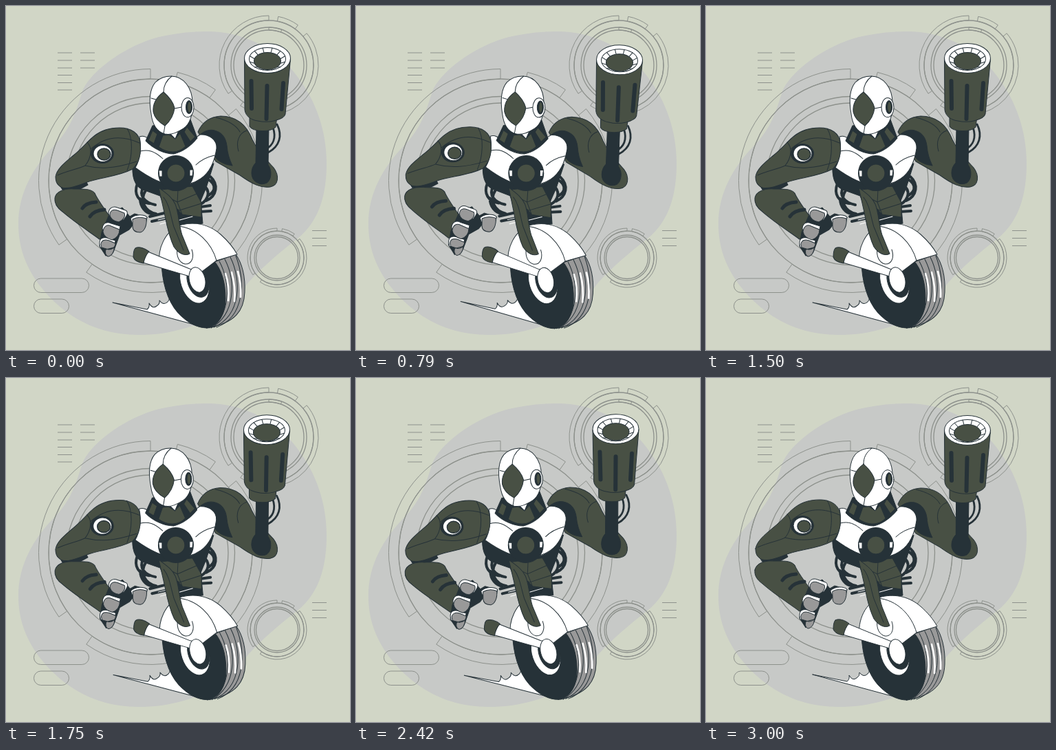
Write an HTML page that moves like this. It is 500 px wide and 500 px high and loops after 3.04 s.

```html
<!DOCTYPE html>
<html lang="en">
<head>
<meta charset="utf-8">
<title>Robot on a wheel</title>
<style>
html, body { margin: 0; width: 100%; height: 100%; overflow: hidden; background: #d1d6c6; }
svg { display: block; width: 100vw; height: 100vh; }
#rings, #panel { fill: none; stroke: #8d918c; stroke-width: 1; }
#robot { stroke: #263238; stroke-width: 1; stroke-linejoin: round; stroke-linecap: round; }
.inner { stroke-width: 1.3; }
.olive { fill: #485044; }
.dark { fill: #263238; }
.white { fill: #fff; }
.grey { fill: #999; }
.line { fill: none; }
.cable { fill: none; stroke-width: 4; }
.slot { fill: none; stroke-width: 6; }
.shine { fill: none; stroke: #fff; stroke-width: 2.6; }
</style>
</head>
<body>
<svg viewBox="0 0 500 500">
  <path fill="#c7c9c7" d="M290 37C340 36 385 58 415 92C448 130 466 178 466 228C466 275 455 312 425 337C402 355 378 374 352 402C330 432 305 455 265 467C235 476 215 478 192 478C120 478 75 440 48 405C25 373 18 345 18 316C18 272 40 234 68 205C92 181 100 160 111 124C124 92 182 52 232 43C252 39 270 37 290 37Z"/>
  <g id="rings"></g>
  <g id="panel">
    <path d="M75 68h21M75 79h21M75 90h21M75 100.500h21M75 111.500h21M75 122h21M108 68h21M108 79h21M108 90h21M445 326.500h21M445 337.500h21M445 348.500h21"/>
    <rect x="40.500" y="396" width="80" height="20.500" rx="10.250"/>
    <rect x="40.500" y="426" width="51" height="20.500" rx="10.250"/>
  </g>

  <g id="robot">
    <!-- raised arm -->
    <path class="olive" d="M279 183C285 169 296 161 312 160C334 160 349 171 358 194C366 211 378 223 389 235C398 247 396 261 384 263C371 265 358 259 340 246L305 226Z"/>
    <path class="dark" d="M281 188C296 174 318 180 321 203C322 215 325 224 329 232C315 230 306 224 302 216Z"/>
    <path class="line" d="M305 162C321 166 334 172 340 183M350 181C338 185 334 198 338 211"/>
    <path class="cable" style="stroke-width:2.800" d="M386 172C393 186 391 199 381 206M394 172C402 188 398 204 381 213"/>
    <path class="dark" d="M364 177H382L381 231C387 239 386 252 379 257C368 262 357 254 357 243C357 236 360 231 363 228Z"/>
    <path class="olive" d="M354 160V175C359 183 384 184 392 176L394 160Z"/>
    <path class="olive" d="M346.500 77L347 151C348 159 355 165 366 167C382 171 404 165 406 157L413.500 77Z"/>
    <path class="slot" d="M356.500 109L357 149M379.500 116L378.500 164M403 112L400.500 150"/>
    <ellipse class="white" cx="380" cy="76" rx="33.500" ry="21.500"/>
    <ellipse class="white" cx="380" cy="77" rx="26.500" ry="16.500"/>
    <g id="muzzle"></g>
    <ellipse class="olive" cx="380" cy="80" rx="19.500" ry="12.500"/>

    <!-- waist cables and torso -->
    <path class="cable" d="M191 258C185 274 193 285 208 287M200 262C192 276 202 286 217 289M203 268C193 284 203 299 218 302M195 280C195 292 203 301 212 302M289 250C304 255 308 268 293 276M297 248C309 259 307 276 291 283M286 260C298 268 295 281 283 288M283 292L297 290M282 299L298 298M209 306L230 301M212 313L240 307"/>
    <path class="dark" d="M184 228C183 248 186 261 199 267L224 276L236 306L250 322L286 316L283 283L291 264L302 229Z"/>
    <path class="olive" d="M226 267L271 262L284 286V307L256 303L239 285Z"/>
    <path class="line" d="M234 277L249 285L277 273M240 291L252 297L284 287M250 267L249 285L256 303"/>
    <path class="line" style="stroke:#fff" d="M249 312L271 306M221 311L242 306M224 317L243 312"/>

    <!-- dust -->
    <path class="white" d="M155 431L205 441Q209 438 208 432Q213 441 219 436Q224 433 223 428Q229 436 235 430Q239 426 237 419L260 445L292 468Z"/>

    <!-- wheel -->
    <path class="grey" d="M300 373L334 361C343 374 348 394 347 416C346 442 334 461 292 468Z"/>
    <path class="line" d="M334 363C348 400 347 452 306 467M326 365C342 397 343 449 302 467M318 368C334 399 334 448 298 468M310 371C327 402 327 451 295 468"/>
    <path class="shine" d="M319 389Q325 407 323 428M328 387Q334 408 332 429M337 386Q342 403 341 423"/>
    <path class="dark" d="M226 368C226 399 234 428 250 446C266 463 280 468 292 468C309 465 319 448 319 425C319 400 313 383 302 370Z"/>
    <ellipse class="white" cx="274" cy="401" rx="20" ry="32" transform="rotate(-18 274 401)"/>
    <ellipse class="dark" cx="279" cy="400" rx="15" ry="24" transform="rotate(-18 279 400)"/>
    <path class="white" d="M223 376C220 353 231 326 255 318C277 313 297 319 312 332C322 341 330 350 336 361L306 370L285 386L264 386Z"/>
    <path class="line" d="M249 320C278 322 299 345 306 370"/>
    <path class="white" d="M249 352C247 364 252 373 260 375C270 376 274 365 270 354"/>
    <path class="white" d="M206 357L267 382C276 383 283 390 277 399L267 393L199 373Z"/>
    <path class="olive" d="M188 352C193 349 202 352 208 357C204 361 201 367 200 374C194 373 187 371 185 365C185 359 186 354 188 352Z"/>
    <ellipse class="white" cx="278" cy="398" rx="11.500" ry="18.500" transform="rotate(-14 278 398)"/>

    <!-- thigh -->
    <path class="olive" d="M222 264C231 271 241 277 246 288C251 300 251 318 256 333L267 360C260 364 251 360 244 350C236 333 233 315 230 300Z"/>
    <path class="line" d="M229 278C238 289 239 305 244 321L258 355"/>

    <!-- chest and neck -->
    <path class="white" d="M194 190C202 187 207 193 213 198L236 211L266 198L282 187C295 186 307 194 306 207C303 227 296 242 283 251C273 258 263 261 247 261C227 260 207 249 188 235C196 221 197 205 194 190Z"/>
    <path class="line" d="M195 211C207 208 216 211 228 222M276 231Q286 221 303 217"/>
    <path class="dark" d="M213 174L203 196C214 208 231 215 244 215C257 212 269 203 278 192L268 165Z"/>
    <path class="olive" d="M213 181L207 195L215 200L220 186ZM228 188L222 205C236 215 251 214 261 204L253 185L246 193L237 187ZM263 176L275 190L268 197L259 183Z"/>
    <path class="white" d="M238 185L246 193L252 179Z"/>
    <circle class="dark" cx="247" cy="243" r="25.500"/>
    <circle class="olive" cx="247" cy="243" r="13"/>
    <path class="white" d="M222 239H227V248H223ZM267 238H272L271 247H267Z"/>

    <!-- head -->
    <path class="white" d="M240 102C258 102 271 119 271 141C272 158 267 172 258 178C250 183 241 188 231 186C220 183 213 173 211 157C208 140 208 122 217 111C223 105 231 102 240 102Z"/>
    <path class="olive" d="M229 125C237 132 243 140 245 148C244 158 239 167 231 174C222 169 216 163 214 154C213 143 218 133 229 125Z"/>
    <path class="line" d="M241 102C232 109 229 116 229 125M231 174L229 186M245 149L255 147M211 134L218 136"/>
    <ellipse class="white" cx="264" cy="147.500" rx="9" ry="14"/>
    <ellipse class="dark" cx="266" cy="147" rx="4.500" ry="9.500"/>
    <ellipse class="olive" cx="266.500" cy="147" rx="2.800" ry="8"/>

    <!-- lowered arm -->
    <path class="dark" d="M78 260L115 252L119 260L104 268L82 267Z"/>
    <path class="olive" d="M72 248C74 237 84 229 97 218C112 206 119 196 128 189C139 180 152 177 165 177C182 177 194 185 195 199C197 214 193 228 184 237C163 248 137 249 118 256C103 262 84 269 77 261C73 258 72 253 72 248Z"/>
    <path class="line" d="M118 198C126 206 124 221 115 232C105 237 91 239 75 246M123 208C142 191 165 186 194 199M176 178C185 192 184 219 176 239M115 232C135 237 156 237 190 226"/>
    <ellipse class="dark" cx="140" cy="214.500" rx="16.500" ry="14"/>
    <ellipse class="white" cx="140.500" cy="214.500" rx="13.500" ry="12"/>
    <ellipse class="olive" cx="142.500" cy="215.500" rx="9.500" ry="8.500" style="stroke-width:1.500"/>
    <path class="olive" d="M71 279C73 269 85 265 99 266C112 266 123 265 129 272C132 280 143 295 153 309C151 323 145 334 136 339C118 326 98 313 82 299C74 293 70 287 71 279Z"/>
    <path class="cable" style="stroke-width:5" d="M111 294Q116 286 131 285M122 306Q128 297 143 296"/>

    <!-- hand -->
    <path class="dark" d="M150 303L169 293L180 306L187 302L205 307L203 314L188 314L179 325L165 333L157 355L145 363L136 349L139 329Z"/>
    <path class="white" d="M149 302C149 294 155 290 162 293L174 297C179 300 175 306 171 311L151 306ZM140 323C141 315 147 313 153 316L166 320L164 330L141 329ZM136 345C136 337 141 336 147 337L159 341L157 351L137 351ZM181 309C188 302 201 303 205 307L204 313L183 315Z"/>
    <path class="grey" d="M151 304C151 297 156 295 162 297L172 301C174 306 170 312 164 314C158 313 152 310 151 304ZM141 328C142 320 147 317 153 320L165 325C165 332 161 338 154 340C147 338 142 334 141 328ZM138 346C139 340 144 339 150 341L159 345C159 351 154 354 149 354L139 351ZM145 354L157 351C158 357 153 364 148 364C144 362 144 358 145 354ZM184 310Q193 305 204 309C205 319 201 328 195 329C187 329 184 326 184 320Z"/>
  </g>
</svg>
<script>
const LOOP = 3040, SWING = 3000;
const byId = id => document.getElementById(id);
const polar = (cx, cy, r, deg) => {
  const a = deg * Math.PI / 180;
  return `${(cx + r * Math.cos(a)).toFixed(2)} ${(cy + r * Math.sin(a)).toFixed(2)}`;
};
const circle = (cx, cy, r) => `<circle class="inner" cx="${cx}" cy="${cy}" r="${r}"/>`;

// Closed ring segment running clockwise from one angle to the other.
function band(cx, cy, inner, outer, from, to) {
  const large = to - from > 180 ? 1 : 0;
  return `<path d="M${polar(cx, cy, outer, from)}A${outer} ${outer} 0 ${large} 1 ${polar(cx, cy, outer, to)}` +
    `L${polar(cx, cy, inner, to)}A${inner} ${inner} 0 ${large} 0 ${polar(cx, cy, inner, from)}Z"/>`;
}

function dial(cx, cy, inner, outer, spans, radii) {
  return spans.map(([from, to]) => band(cx, cy, inner, outer, from, to)).join('') +
    radii.map(r => circle(cx, cy, r)).join('');
}

byId('rings').innerHTML =
  dial(210, 254, 148, 162.5, [[145, 270], [-76, -54.5], [-40, 125]], [148, 122.5, 113]) +
  dial(382, 86, 65, 72, [[145, 270], [-79, -54], [-40, 125]], [65, 55, 51]) +
  band(382, 86, 51, 55, -90, -70) +
  dial(394, 366, 39, 43, [[145, 270], [-80, -54], [-40, 125]], [39, 33, 30.5]);

// Spokes between the rim and the bore of the muzzle.
byId('muzzle').innerHTML = Array.from({ length: 12 }, (_, i) => {
  const a = (i * 30 + 15) * Math.PI / 180, c = Math.cos(a), s = Math.sin(a);
  return `<path d="M${380 + 19.5 * c} ${80 + 12.5 * s}L${380 + 26.5 * c} ${77 + 16.5 * s}"/>`;
}).join('');

// Straight swing: 0 to 1 degree, to -1 degree, back to 0.
function tilt(p) {
  if (p < 0.25) return p * 4;
  if (p < 0.75) return 2 - p * 4;
  return p * 4 - 4;
}

const robot = byId('robot');
const start = performance.now();
function draw(now) {
  const t = Math.max(0, now - start) % LOOP;
  robot.setAttribute('transform', `rotate(${tilt(Math.min(t / SWING, 1))} 243 261)`);
  requestAnimationFrame(draw);
}
draw(start);
</script>
</body>
</html>
```
